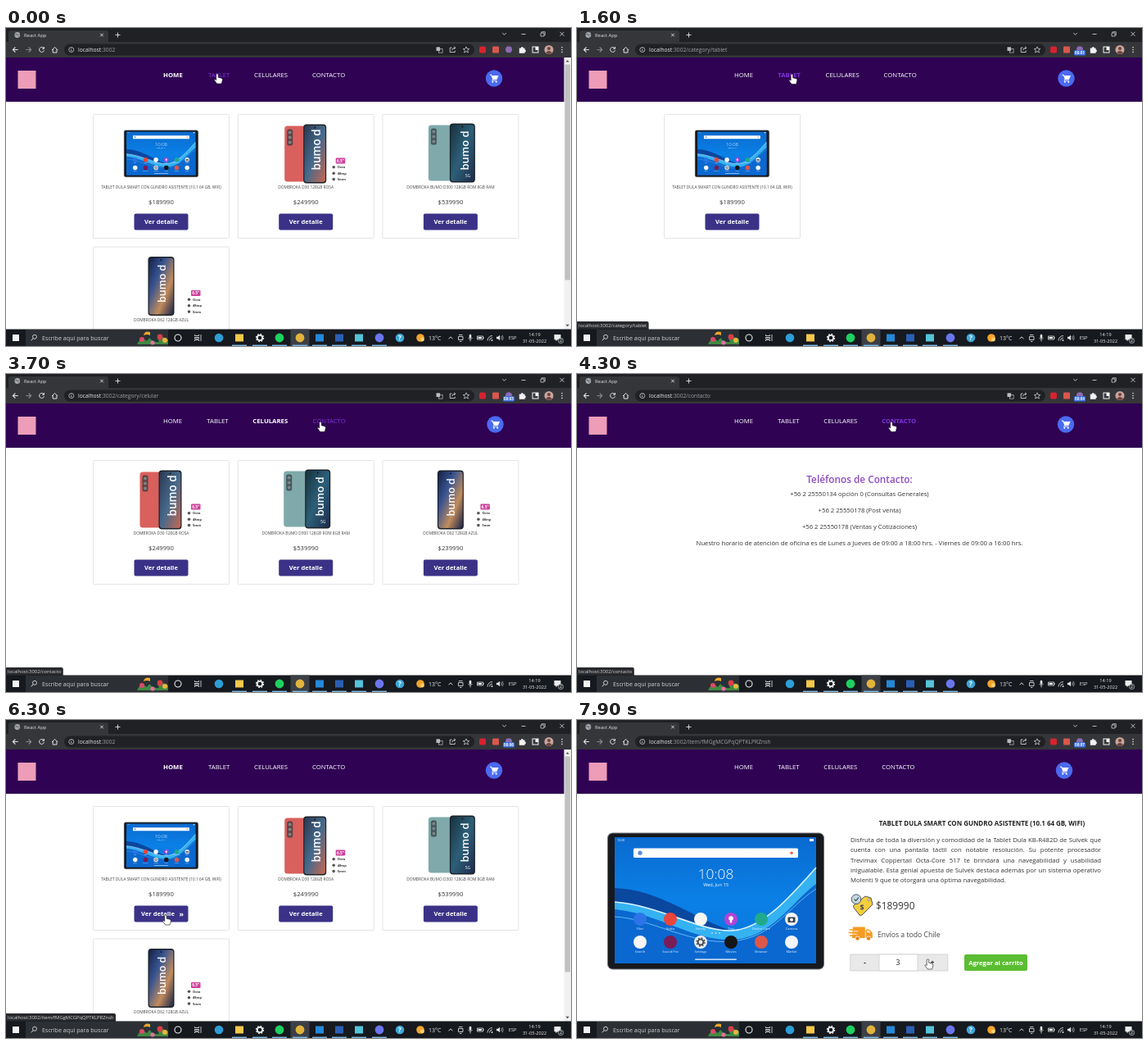
Write an HTML page that moves like this. It is 690x388 px and loops after 8000 ms.

```html
<!DOCTYPE html>
<html lang="es">
<head>
<meta charset="utf-8">
<title>React App</title>
<style>
html, body { margin: 0; width: 100%; height: 100%; overflow: hidden; background: #fff; }
svg { display: block; width: 690px; height: 388px; }
text, .para { font-family: "Open Sans", "Noto Sans", sans-serif; }
.para { font-size: 7.75px; line-height: 12.15px; color: #333; }
.para div { white-space: nowrap; text-align: justify; text-align-last: justify; }
.para div:last-child { text-align-last: left; }
</style>
</head>
<body>
<svg id="stage" viewBox="0 0 690 388" xmlns="http://www.w3.org/2000/svg"></svg>
<script>
const LOOP = 8000;
const PURPLE = '#7f35dd';
const ITEM = '/item/fMGgMCGPqQPTKLPRZnsh';
const TABLET_NAME = 'TABLET DULA SMART CON GUNDRO ASISTENTE (10.1 64 GB, WIFI)';

// Markup helpers
const rect = (x, y, w, h, fill, more = '') =>
  `<rect x="${x}" y="${y}" width="${w}" height="${h}" fill="${fill}" ${more}/>`;
const dot = (x, y, r, fill, more = '') =>
  `<circle cx="${x}" cy="${y}" r="${r}" fill="${fill}" ${more}/>`;
const line = (d, stroke, width = 1, more = '') =>
  `<path d="${d}" fill="none" stroke="${stroke}" stroke-width="${width}" ${more}/>`;
const shape = (d, fill, more = '') => `<path d="${d}" fill="${fill}" ${more}/>`;
const text = (x, mid, s, size, fill, more = '') =>
  `<text x="${x}" y="${mid + size * 0.36}" font-size="${size}" fill="${fill}" ${more}>${s}</text>`;
const MID = 'text-anchor="middle"';
const BOLD = 'font-weight="700"';
const group = (id, body, more = '') => `<g id="${id}" ${more}>${body}</g>`;
const move = (x, y, body) => `<g transform="translate(${x} ${y})">${body}</g>`;

const gradient = (id, colors, x2 = 0, y2 = 1) =>
  `<linearGradient id="${id}" x2="${x2}" y2="${y2}">` +
  colors.map((c, i) => `<stop offset="${i / (colors.length - 1)}" stop-color="${c}"/>`).join('') +
  '</linearGradient>';

// Product pictures
function tablet() {
  const apps = [
    ['Files', '#2c74e8'], ['Video', '#e9453c'], ['Family', '#f4f7f2'],
    ['Tips', '#b045d6'], ['Device Care', '#20a98c'], ['Camera', '#f3f3f3'],
    ['Search', '#f5f5f5'], ['Sound Pro', '#7b1b58'], ['Settings', '#eceff1'],
    ['Movies', '#151515'], ['Browser', '#df5748'], ['Market', '#f3f6f7']
  ];
  const icons = apps.map(([name, color], i) => {
    const x = 77 + 37 * (i % 6), y = i < 6 ? 243 : 271;
    return dot(x, y, 8, color) + text(x, y + 11.6, name, 4, '#e8f3ff', MID);
  }).join('');
  const glyphs = dot(188, 242, 2.8, '#fff') + rect(186.8, 244, 2.4, 3.4, '#fff') +
    rect(257.5, 240.5, 9, 6.5, '#3a3f45', 'rx="1"') + dot(262, 243.8, 2, '#f3f3f3') +
    dot(151, 271, 3.4, 'none', 'stroke="#4a5056" stroke-width="2"') +
    dot(151, 271, 5, 'none', 'stroke="#4a5056" stroke-width="1.4" stroke-dasharray="1.96"');
  return rect(37.5, 138, 264, 166, '#17191d', 'rx="6" stroke="#6b7076" stroke-width="1"') +
    rect(46, 143, 246, 154, 'url(#sky)') +
    shape('M46 214C95 212 135 250 180 257S262 212 292 183V297H46Z', '#0a68d0') +
    shape('M46 205C100 207 140 240 185 256C150 258 100 226 46 222Z', '#0a479f') +
    shape('M46 222C100 226 150 258 188 257S262 214 292 180V200C264 220 238 266 190 268S100 236 46 231Z', '#35b2f2') +
    line('M46 222C100 226 150 258 188 257S262 214 292 180', '#d9f3ff', 1.6) +
    line('M46 240C90 242 140 275 190 270S258 228 292 206', '#7ccbf6', 0.8) +
    rect(69, 156.5, 201, 11.5, '#fff', 'rx="1.5"') +
    dot(77, 162.2, 2.6, '#5a8de8') + dot(262, 162.2, 1.8, '#e8674c') +
    text(49, 147, '10:08', 3.6, '#fff') + rect(284, 145, 5, 3, '#fff') +
    text(169.5, 187.5, '10:08', 17.3, '#fff', MID + ' font-weight="300"') +
    text(169.5, 200.5, 'Wed, Jun 15', 5.6, '#fff', MID) + icons + glyphs +
    [165, 169.5, 174].map(x => dot(x, 260, 0.8, '#fff')).join('') +
    rect(144, 291.5, 51, 1.2, '#fff', 'rx=".6"');
}

const smallTablet = () =>
  `<g transform="translate(37.5 19) scale(.343) translate(-37 -137)">${tablet()}</g>`;

const badge = () => rect(119.5, 53, 11.5, 7, '#cf3f9c', 'rx="1"') +
  text(125.2, 56.5, '6.5”', 4.8, '#fff', MID + ' ' + BOLD) +
  ['Octa', '48mp', '5mm'].map((s, i) => dot(117, 64.3 + 7.4 * i, 1.8, '#555') +
    text(121.5, 64.3 + 7.4 * i, s, 4, '#333', BOLD)).join('');

function phone(back, front, x, w, top, label, size, lx) {
  const rear = back ? rect(x - w + 5, top + 2, w - 2, 68, back, 'rx="3.5"') +
    rect(x - w + 8, top + 6, 7, 20, '#2c3438', 'rx="2.5" opacity=".7"') +
    [10, 16, 22].map(y => dot(x - w + 11.5, top + y, 2, '#78858a')).join('') : '';
  return rear + rect(x, top, w, 72, '#1b2027', 'rx="4"') +
    rect(x + 1.2, top + 1.5, w - 2.4, 69, `url(#${front})`, 'rx="3"') +
    dot(x + w / 2, top + 4, 0.9, '#111') +
    `<text transform="translate(${lx} 68) rotate(-90)" font-size="${size}" fill="#fff" font-weight="600">${label}</text>`;
}

const PRODUCTS = {
  tablet: [TABLET_NAME, '$189990', smallTablet()],
  rose: ['DOMBROKA D30 128GB ROSA', '$249990',
    phone('#d9605c', 'warm', 80, 28, 12, 'bumo d', 13.5, 101) + badge()],
  teal: ['DOMBROKA BUMO D300 128GB ROM 8GB RAM', '$539990',
    phone('#7fa9ab', 'aqua', 82, 31, 11, 'bumo d', 13, 105) + text(104, 75, '5G', 5, '#fff', MID)],
  blue: ['DOMBROKA D62 128GB AZUL', '$239990',
    phone('', 'night', 67, 32, 12, 'bumo d', 12.5, 88) + badge()]
};

function card(name, slot, id = '') {
  const [title, price, art] = PRODUCTS[name];
  const x = 106.5 + 176.7 * (slot % 3), y = slot < 3 ? 105.5 : 267;
  return move(x, y, rect(0, 0, 166, 151, '#fff', 'stroke="#dedede" stroke-width=".8" rx="1"') + art +
    text(83, 89, title, 4.83, '#444', MID) + text(83, 107, price, 7.7, '#333', MID) +
    rect(50, 121, 66, 20, '#3b3287', 'rx="2"') +
    text(83, 131.2, 'Ver detalle', 7.57, '#fff', `${MID} ${BOLD} ${id && `id="${id}"`}`) +
    (id ? text(105, 131, '»', 9, '#fff', `${BOLD} id="chevron" opacity="0"`) : ''));
}

// Browser frame
function chrome() {
  const g = '#dfe1e5';
  return rect(0, 0, 690, 18, '#202124') + shape('M3 18V6q0-3 3-3H122q3 0 3 3V18Z', '#35363a') +
    rect(0, 17, 690, 19, '#35363a') +
    dot(13.8, 8.5, 3.4, '#a9adb2') + line('M10.6 8h6.4M12 6.2l3.5 4.8', '#55585c', 0.7) +
    text(22, 8.5, 'React App', 5.85, '#e3e5e8') +
    line('M115.2 6.7l3.6 3.6m0-3.6l-3.6 3.6M133.5 8.5h6m-3-3v6', g, 0.9) +
    line('M606.2 6l2.3 2.3 2.3-2.3M629.5 7.5h5M676.5 4.8l5 5m0-5l-5 5', g, 0.8) +
    line('M653 6h4v4h-4zM654.3 6V4.7h4v4h-1.2', g, 0.7) +
    line('M14.8 26.5H8.6m2.8-3l-3 3 3 3', g, 1.1) +
    line('M24.3 26.5h6.2m-2.8-3l3 3-3 3', '#85888c', 1.1) +
    line('M46 24.6a3 3 0 1 0 .5 2.6M46.5 23v2.3h-2.3', g, 1) +
    line('M56 27l3.6-3.6 3.6 3.6M57.2 26v4h4.8v-4', g, 1) +
    rect(71, 19.5, 501, 14, '#202124', 'rx="7"') +
    dot(79.8, 26.5, 3, 'none', `stroke="${g}" stroke-width=".7"`) + line('M79.8 26v2.2m0-3.8v.8', g, 0.8) +
    `<text x="88" y="28.9" font-size="6.72" fill="#e8eaed">localhost<tspan id="path" fill="#9aa0a6"></tspan></text>` +
    rect(525.5, 23.3, 4.6, 4.6, '#b9bcc0') + rect(528.6, 25.6, 4.5, 4.5, 'none', 'stroke="#b9bcc0" stroke-width=".7"') +
    line('M544.5 24h-2.3v5.5h6v-2M544.5 27.2q.5-3 4.2-3m-1.5-1.6l1.7 1.6-1.7 1.6', g, 0.8) +
    line('M562 22.8l1.1 2.5 2.7.2-2.1 1.8.7 2.7-2.4-1.5-2.4 1.5.7-2.7-2.1-1.8 2.7-.2z', g, 0.7) +
    rect(578, 22.6, 8, 8, '#d8232f', 'rx="2"') + rect(594, 22.6, 8, 8, '#d9574c', 'rx="1"') +
    dot(614, 26.3, 4, '#8d6bb4') +
    group('rec', rect(607, 27, 14, 6.4, '#3c6fe0', 'rx="1.5"') +
      text(614, 30.2, '00:01', 4.6, '#fff', `${MID} ${BOLD} id="clock"`)) +
    shape('M626.8 24.4h2.2a1.3 1.3 0 0 1 2.6 0h2v2.2a1.3 1.3 0 0 1 0 2.6v1.6h-6.8z', '#f1f3f4') +
    rect(643, 23, 7, 7, 'none', 'stroke="#f1f3f4" stroke-width="1"') + rect(646.5, 23, 3.5, 4, '#f1f3f4') +
    dot(663, 26.5, 5.5, '#c9a59b') + dot(663, 25, 2.1, '#6d4540') + shape('M659 30.2q4-5 8 0q-4 3.5-8 0', '#6d4540') +
    [23.6, 26.5, 29.4].map(y => dot(679, y, 0.8, g)).join('');
}

function header() {
  return rect(0, 36, 690, 54, '#2f0253') + rect(14.5, 52, 22, 22, '#ee9db8') +
    ['HOME', 'TABLET', 'CELULARES', 'CONTACTO'].map(s => text(0, 57.3, s, 7.75, '#fff', 'class="nav"')).join('') +
    group('cart', dot(0, 0, 10.2, '#4a6af0') + '<g transform="scale(.85)">' +
      line('M-6-5h2l2.6 6H3.6l2-4.4H-3', '#fff', 1.2) +
      shape('M-3.4-3.4H5.6L3.6.8H-1.8z', '#fff') + line('M-1.8 1l-1 2H4', '#fff', 1) +
      dot(-2, 5, 1.2, '#fff') + dot(3.2, 5, 1.2, '#fff') + '</g>');
}

const scrollbar = () => group('scroll', rect(681.5, 36, 8.5, 332, '#f1f1f1') +
  rect(682.5, 44.5, 6.5, 263, '#c1c1c1') +
  shape('M683.5 41.6l2.2-2.4 2.2 2.4z', '#505050') + shape('M683.5 361.8l2.2 2.4 2.2-2.4z', '#505050'));

function taskbar() {
  const apps = [[285, '#f4c84a', 1], [334, '#1ed05f', 0], [359, '#e2b33c', 0], [383, '#2489d8', 1],
    [407, '#2b5fb4', 1], [431, '#55c3d8', 1], [456, '#6a76ee', 0]];
  const w = '#eee';
  return rect(0, 367.5, 690, 20.5, '#16191e') + rect(347.5, 367.5, 23, 20.5, '#3c4046') +
    rect(8, 374, 8, 8, '#f2f2f2') + rect(24, 368, 174, 20, '#2c3034') +
    dot(35, 376.8, 2.5, 'none', `stroke="${w}" stroke-width=".8"`) + line('M33.2 378.7l-2.4 2.6', w, 0.9) +
    text(44, 378, 'Escribe aquí para buscar', 7.17, '#cfd1d3') +
    shape('M160 386q5-11 12-4q5-8 11-1q8-7 15-1v6z', '#3f8a42') +
    shape('M174 370q7-2 9 4l4 9q-9 1-12-6z', '#23333a') + shape('M176 371q-7-2-8 4q4-2 8 0z', '#f2a627') +
    dot(166, 380, 3, '#db4b66') + dot(188, 377, 3.4, '#d93f48') + dot(194, 381, 3, '#e9b53f') + dot(179, 384, 2.6, '#e3719f') +
    dot(210, 378, 4, 'none', `stroke="${w}" stroke-width="1.1"`) +
    line('M230.5 374v1.5h5V374m-5 8v-1.5h5V382M230.5 377.5h5v1.5h-5zM238 374v8', w, 0.8) +
    dot(260, 378, 5.3, '#2d9ed6') +
    dot(310, 378, 3.2, 'none', `stroke="${w}" stroke-width="1.8"`) +
    dot(310, 378, 4.6, 'none', `stroke="${w}" stroke-width="1.2" stroke-dasharray="1.8 1.8"`) +
    apps.map(([x, c, sq]) => sq ? rect(x - 5, 373.5, 10, 9, c) : dot(x, 378, 5.4, c)).join('') +
    [285, 310, 334, 359, 383, 407, 431, 456].map(x => rect(x - 9, 386.6, 18, 1.4, '#7bb8e6')).join('') +
    dot(481, 378, 5.3, '#3ea7d8') + text(481, 378, '?', 8, '#fff', MID + ' ' + BOLD) +
    dot(506, 378, 4.8, '#f4a42c') + dot(508.5, 380, 2.4, '#f8d078') + text(516, 378.2, '13°C', 7, w) +
    line('M540.5 379.3l2.5-2.5 2.5 2.5', w, 0.9) +
    line('M552.5 376.5h5.5v4h-5.5zM553 374.5h4.5M554 382.5h2.5', w, 0.8) +
    rect(565.7, 373.8, 2.6, 5, w, 'rx="1.3"') + line('M564.5 378q2.5 4 5 0M567 380v2.5', w, 0.7) +
    line('M575.5 376h7v4h-7zM583.2 377.2v1.6', w, 0.8) + rect(576.5, 377, 4.5, 2, w) +
    line('M588 381.5a6 6 0 0 1 6-6m-3.5 6a3.5 3.5 0 0 1 3.5-3.5', w, 0.8) + dot(593.5, 381, 0.9, w) +
    shape('M599 376.8h1.8l2.2-2v6.4l-2.2-2H599z', w) + line('M604.5 376q1.3 2 0 4m1.6-5.2q2.2 3.2 0 6.4', w, 0.6) +
    text(613.7, 378, 'ESP', 5.8, w) + text(645.5, 373.5, '14:19', 5.6, w, MID) +
    text(645.5, 382.3, '31-05-2022', 5.6, w, MID) +
    shape('M669.5 374h8v6.2h-4l-2 2v-2h-2z', w) + dot(677.5, 381.5, 3.2, '#30343a', `stroke="${w}" stroke-width=".5"`) +
    text(677.5, 381.5, '2', 4.5, w, MID);
}

// Pages
function contact() {
  const rows = ['+56 2 25550134 opción 0 (Consultas Generales)', '+56 2 25550178 (Post venta)',
    '+56 2 25550178 (Ventas y Cotizaciones)',
    'Nuestro horario de atención de oficina es de Lunes a Jueves de 09:00 a 18:00 hrs. - Viernes de 09:00 a 16:00 hrs.'];
  return text(345, 128.5, 'Teléfonos de Contacto:', 11.8, '#8f4cc2', MID + ' font-weight="600"') +
    rows.map((s, i) => text(345, 146 + 20.2 * i, s, 7.7, '#333', MID)).join('');
}

function detail() {
  const rows = ['Disfruta de toda la diversión y comodidad de la Tablet Dula KB-R482D de Sulvek que',
    'cuenta con una pantalla táctil con notable resolución. Su potente procesador',
    'Trevimax Coppertail Octa-Core 517 te brindará una navegabilidad y usabilidad',
    'inigualable. Esta genial apuesta de Sulvek destaca además por un sistema operativo',
    'Molenti 9 que te otorgará una óptima navegabilidad.'];
  const o = '#f59b23';
  const wheel = x => dot(x, 266.5, 2.6, '#e48312', 'stroke="#fff" stroke-width=".8"');
  const truck = shape('M337 252.5h14.8v13.5H336zM352.6 255.5h4.4l3.8 4.2v6.3h-8.2z', o) +
    line('M333 256h9M331.5 259.5h8.5M333 263h6', o, 1.6) +
    line('M337.5 257.8h6M336.8 261.3h5', '#fff', 0.8) +
    shape('M354.2 257h2.4l2 2.4h-4.4z', '#fff3dc') + wheel(342.5) + wheel(356);
  const gray = 'stroke="#cdcdcd" stroke-width=".8"';
  return group('edge', rect(20, 110, 1, 221, '#666')) + tablet() +
    text(494.5, 126.5, TABLET_NAME, 7.95, '#222', MID + ' ' + BOLD) +
    `<foreignObject x="334" y="140.3" width="306" height="64"><div xmlns="http://www.w3.org/1999/xhtml" class="para">${
      rows.map(s => `<div>${s}</div>`).join('')}</div></foreignObject>` +
    group('tag', shape('M338 226l14-11 7 2 2 8-13 13q-2 1-3 0l-7-9q-1-2 0-3z', '#f3cf3f', 'stroke="#3c4654" stroke-width=".9"') +
      dot(356.5, 219.5, 1.3, '#fff', 'stroke="#3c4654" stroke-width=".6"') +
      text(348, 229, '$', 9, '#3c4654', MID + ' ' + BOLD) +
      dot(341, 218.7, 5.8, '#c7d7e2', 'stroke="#3c4654" stroke-width=".9"') +
      line('M338.5 218.7l2 2 3.5-4', '#3c4654', 1.1)) +
    group('price', text(365, 227, '$189990', 11.85, '#333')) +
    group('buy', truck + text(367, 261.5, 'Envíos a todo Chile', 8.7, '#444') +
      rect(333.8, 286, 119, 20, '#e9e9e9', gray) + rect(369, 286, 47, 20, '#fff', gray) +
      text(351.5, 296, '-', 8, '#222', MID + ' ' + BOLD) + text(434, 296, '+', 8, '#222', MID + ' ' + BOLD) +
      text(392, 296, '1', 8.6, '#222', MID + ' id="count"') +
      rect(473, 286, 77, 20, '#5bbd31', 'rx="2"') +
      text(511.5, 296, 'Agregar al carrito', 7.65, '#fff', MID + ' ' + BOLD));
}

const pages = {
  home: card('tablet', 0, 'more') + card('rose', 1) + card('teal', 2) + card('blue', 3),
  tablet: card('tablet', 0),
  phones: card('rose', 0) + card('teal', 1) + card('blue', 2),
  contact: contact(),
  detail: detail()
};

const $ = id => document.getElementById(id);
$('stage').innerHTML =
  '<defs>' + gradient('sky', ['#0a6ad0', '#0a80e6', '#0a72da']) +
  gradient('warm', ['#2b3850', '#456a8c', '#c8664f'], 1, 1) +
  gradient('aqua', ['#17333f', '#2d5f78', '#1d2c4c'], 1, 1) +
  gradient('night', ['#152046', '#37538f', '#c28c5c', '#1a2448'], 1, 1) + '</defs>' +
  rect(0, 0, 690, 388, '#fff') +
  Object.entries(pages).map(([k, v]) => group(k, v)).join('') +
  header() + scrollbar() + chrome() +
  group('status', rect(-2, 358, 90, 12, '#292a2d', 'id="bubble" rx="2"') +
    text(2, 362.7, '', 5.87, '#d5d7da', 'id="link"')) +
  taskbar() +
  group('cursor',
    shape('M-1.3 1a1.25 1.25 0 0 1 2.5 0v3.3l3.9.9q1.5.4 1.3 1.9l-.6 3-.8 1.9H-.3l-3.4-4.6q.6-1.5 2.4.1z', '#fff',
      'id="hand" stroke="#111" stroke-width=".6"') +
    shape('M0 0v8.8l2-1.9 1.4 3.1 1.4-.6-1.4-3h2.9z', '#fff', 'id="arrow" stroke="#111" stroke-width=".5"'));

// Timeline
const CONTENT = [[0, 'home'], [300, 'tablet'], [2900, 'phones'], [3800, 'contact'], [4900, ''],
  [5200, 'home'], [6500, ''], [6700, 'detail']];
const ACTIVE = [[0, 0], [100, 1], [2600, 2], [3800, 3], [4900, 0], [6500, -1]];
const PATHS = [[0, ''], [100, '/category/tablet'], [2600, '/category/celular'], [3800, '/contacto'],
  [4900, ''], [6500, ITEM]];
const STATUS = [[0, null], [200, '/category/tablet'], [1900, '/category/celular'], [3400, '/contacto'],
  [4750, ''], [5900, null], [6050, ITEM], [7000, null]];
const POINTER = [[0, 258, 56], [100, 258, 56], [300, 262.5, 56.5], [1600, 262.5, 56.5], [2050, 309.5, 56.5],
  [2900, 309.5, 56.5], [3600, 384, 58.5], [4300, 384, 58.5], [4850, 203, 57], [5700, 203, 57],
  [6150, 195, 238], [6700, 195, 238], [7450, 428.5, 292], [LOOP, 428.5, 292]];

const at = (list, t) => list.filter(k => k[0] <= t).pop()[1];
const clamp = v => Math.max(0, Math.min(1, v));
const ease = v => v * v * (3 - 2 * v);

function pointer(t) {
  const i = POINTER.findIndex(k => k[0] > t);
  const a = POINTER[i - 1], b = POINTER[i];
  const k = ease((t - a[0]) / (b[0] - a[0]));
  return [a[1] + (b[1] - a[1]) * k, a[2] + (b[2] - a[2]) * k];
}

const navs = [...document.querySelectorAll('.nav')];
const NORMAL = [23.3, 26, 41, 41], HEAVY = [25, 28.3, 43.3, 43];
const CART_X = { '-1': 595, 0: 596, 1: 597.5, 2: 597.5, 3: 597 };
const show = (id, on) => $(id).setAttribute('display', on ? 'inline' : 'none');
const place = (id, x, y) => $(id).setAttribute('transform', `translate(${x} ${y})`);
let lastLink;

function draw(t) {
  const page = at(CONTENT, t), active = at(ACTIVE, t), link = at(STATUS, t);
  const [px, py] = pointer(t);
  Object.keys(pages).forEach(k => show(k, k === page));
  show('scroll', page === 'home');
  $('path').textContent = ':3002' + at(PATHS, t);

  let x = 192, over = false;
  navs.forEach((n, i) => {
    const w = (i === active ? HEAVY : NORMAL)[i];
    const hit = py < 66 && px > x - 3 && px < x + w + 3;
    n.setAttribute('x', x);
    n.setAttribute('font-weight', i === active ? 700 : 400);
    n.setAttribute('fill', hit ? PURPLE : '#fff');
    over = over || hit;
    x += w + 30;
  });
  place('cart', CART_X[active], 61.5);

  show('rec', t >= 1000);
  $('clock').textContent = '00:0' + Math.floor(t / 1000);

  show('status', link !== null);
  if (link !== null && link !== lastLink) {
    $('link').textContent = 'localhost:3002' + link;
    $('bubble').setAttribute('width', $('link').getComputedTextLength() + 6.5);
    lastLink = link;
  }

  const slide = t > 5700 ? ease(clamp((t - 6050) / 250)) : 0;
  place('more', -4 * slide, 0);
  $('chevron').setAttribute('opacity', slide);

  const loaded = t >= 6800;
  show('tag', loaded);
  show('edge', t < 7600);
  place('price', 0, loaded ? 0 : -7.7);
  place('buy', 0, loaded ? 0 : -20.2);
  $('count').textContent = t < 7600 ? 1 : t < 7900 ? 2 : 3;

  const onButton = page === 'home' && py > 226 && py < 247;
  const onPlus = page === 'detail' && px > 416 && py > 286;
  const hand = over || onButton || onPlus;
  show('hand', hand);
  show('arrow', !hand);
  place('cursor', px, py);
}

const start = performance.now();
function tick() {
  draw((performance.now() - start) % LOOP);
  requestAnimationFrame(tick);
}
tick();
</script>
</body>
</html>
```
